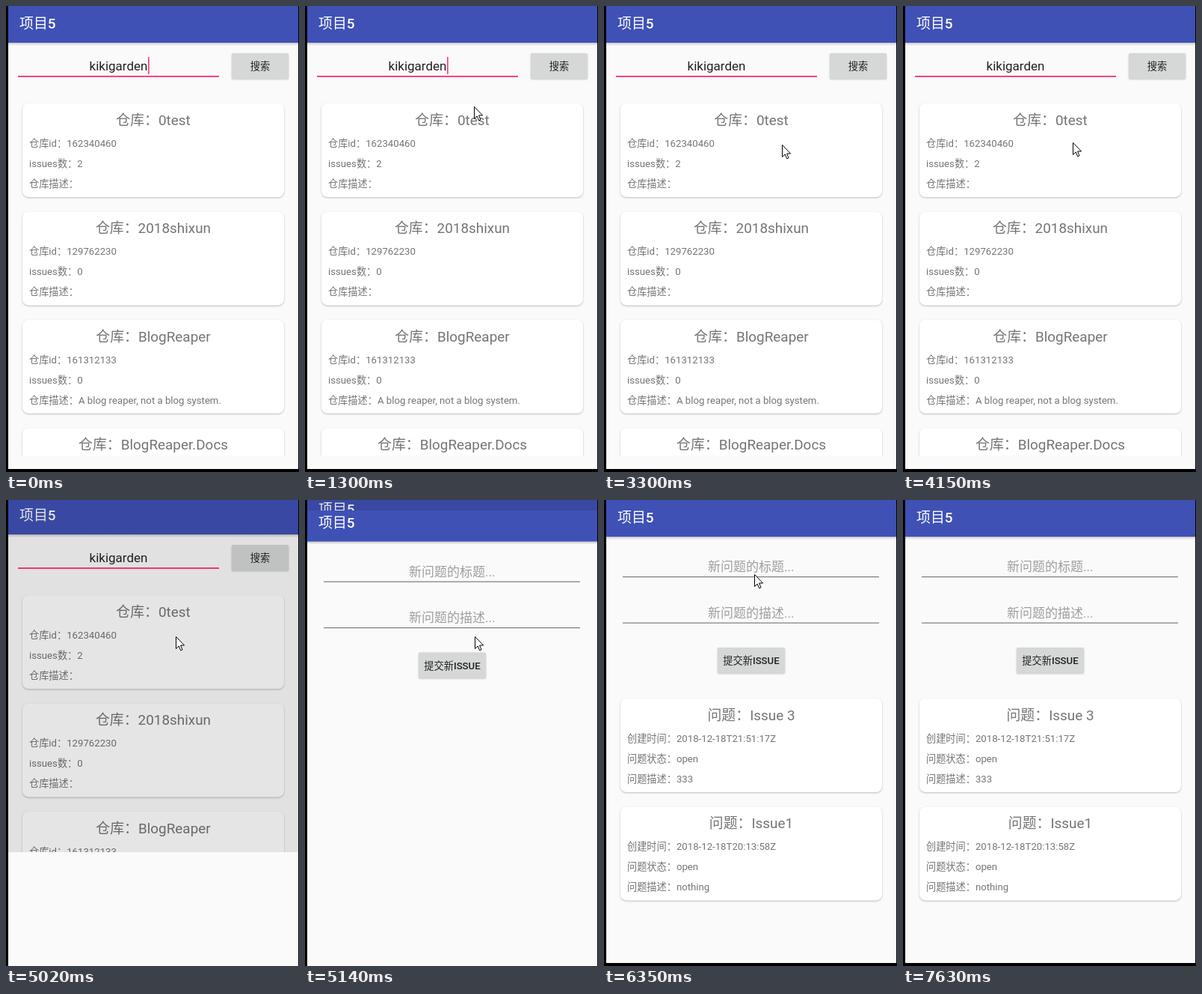
These frames come from a looping animation (392 px wide and 622 px high, 7.99 s). An HTML page:

```html
<!DOCTYPE html>
<html lang="zh-CN">
<head>
<meta charset="utf-8">
<title>项目5</title>
<style>
  html, body { margin: 0; width: 100%; height: 100%; overflow: hidden; background: #000; }
  svg { display: block; width: 392px; height: 622px; }
  text { font: 13.2px Roboto, "Noto Sans CJK SC", "Noto Sans CJK", sans-serif; fill: #757575; white-space: pre; }
  .mid { text-anchor: middle; }
  .bar { font-size: 18.9px; font-weight: 500; fill: #fff; }
  .head { font-size: 18.9px; }
  .field { font-size: 17px; fill: #212121; }
  .hint { font-size: 17px; fill: #9e9e9e; }
  .btn { font-weight: 500; fill: #212121; }
  .card { fill: #fff; filter: drop-shadow(0 1px 1px rgba(0,0,0,.25)); }
  .key { fill: #d6d7d7; filter: drop-shadow(0 1px 1px rgba(0,0,0,.22)); }
</style>
</head>
<body>
<svg id="stage" viewBox="0 0 392 622"></svg>
<script>
const LOOP = 7990;
const OPEN = 5020, SETTLED = 5190, LOADED = 5350;

const text = (x, y, cls, s) => `<text x="${x}" y="${y}" class="${cls}">${s}</text>`;

const card = (y, title, lines) =>
  `<rect class="card" x="22" y="${y}" width="350" height="125" rx="8"/>` +
  text(197, y + 28.8, 'mid head', title) +
  lines.map((s, i) => text(31, y + 57.7 + i * 27.1, '', s)).join('');

const repo = (i, name, id, issues, about) =>
  card(130 + i * 144.4, `仓库：${name}`, [`仓库id：${id}`, `issues数：${issues}`, `仓库描述：${about}`]);

const issue = (i, name, time, about) =>
  card(265 + i * 144.4, `问题：${name}`, [`创建时间：${time}`, '问题状态：open', `问题描述：${about}`]);

const button = (x, y, w, label) =>
  `<rect class="key" x="${x}" y="${y}" width="${w}" height="34" rx="1.5"/>` +
  text(x + w / 2, y + 22, 'mid btn', label);

const hint = (y, label) =>
  text(196.7, y - 6.7, 'mid hint', label) +
  `<rect x="25" y="${y}" width="343" height="1.2" fill="#7c7c7c"/>`;

const page = body =>
  `<rect x="3" width="388" height="618" fill="#fafafa"/>${body}
   <rect x="3" y="49" width="388" height="4" fill="url(#shade)"/>
   <rect x="3" y="-40" width="388" height="89" fill="#3f51b5"/>` +
  text(18, 30, 'bar', '项目5');

const stage = document.getElementById('stage');
stage.innerHTML = `
  <defs>
    <linearGradient id="shade" x2="0" y2="1">
      <stop stop-opacity=".2"/><stop offset="1" stop-opacity="0"/>
    </linearGradient>
    <clipPath id="list"><rect width="392" height="600"/></clipPath>
    <clipPath id="reveal"><rect id="window" width="392" height="622"/></clipPath>
    <clipPath id="screen"><rect x="3" width="388" height="622"/></clipPath>
  </defs>
  <rect width="392" height="622"/>
  <g clip-path="url(#screen)">
    <g id="search">${page(
      text(150.5, 86, 'mid field', 'kikigarden') +
      `<rect id="caret" x="190" y="68" width="1.7" height="23" fill="#ff4081"/>
       <rect x="16" y="93" width="269" height="2" fill="#ff4081"/>` +
      button(302, 63, 76, '搜索') +
      '<g clip-path="url(#list)">' +
      repo(0, '0test', 162340460, 2, '') +
      repo(1, '2018shixun', 129762230, 0, '') +
      repo(2, 'BlogReaper', 161312133, 0, 'A blog reaper, not a blog system.') +
      repo(3, 'BlogReaper.Docs', '', 0, '') +
      '</g>')}</g>
    <rect id="dim" width="392" height="622" opacity=".1"/>
    <g id="cover" clip-path="url(#reveal)"><g id="detail">${page(
      hint(102, '新问题的标题...') +
      hint(163.5, '新问题的描述...') +
      button(152, 197, 90, '提交新ISSUE') +
      '<g id="issues">' +
      issue(0, 'Issue 3', '2018-12-18T21:51:17Z', '333') +
      issue(1, 'Issue1', '2018-12-18T20:13:58Z', 'nothing') +
      '</g>')}</g></g>
  </g>
  <path id="pointer" d="M.5 .5V16.5L4.2 13L6.7 18.8L9 17.8L6.6 12H11.6Z" fill="#fff" stroke="#000"/>`;

const el = id => document.getElementById(id);
const [search, dim, cover, detail, issues, caret, pointer, reveal] =
  ['search', 'dim', 'cover', 'detail', 'issues', 'caret', 'pointer', 'window'].map(el);

// time, x, y
const path = [
  [100, 289, 303], [400, 268, 190], [800, 251, 126], [1300, 226, 134],
  [1600, 215, 170], [2400, 217, 190], [2600, 217, 190], [3400, 241, 184],
  [4100, 227, 182], [5250, 227, 182], [6050, 201, 109], [6350, 201, 99],
  [6750, 201, 86], [7030, 201, 86], [7230, 216, 180], [7530, 261, 539]
];

// time, new page offset, old page offset, top of the revealed part
const slide = [[5020, 23, -3, 470], [5070, 14, -7, 130], [5140, 6.5, -11, 14], [5190, 0, -13, 0]];

function pointAt(t) {
  const i = path.findIndex(p => p[0] > t);
  if (i < 0) return path[path.length - 1].slice(1);
  const [a, b] = [path[i - 1], path[i]];
  const k = (t - a[0]) / (b[0] - a[0]);
  return [1, 2].map(n => Math.round(a[n] + (b[n] - a[n]) * k));
}

// The pointer is redrawn ten times a second.
function tick(t) {
  const phase = t < OPEN ? 0 : t < 7030 ? 50 : 30;
  return Math.floor((t - phase) / 100) * 100 + phase;
}

const show = (node, on) => node.setAttribute('visibility', on ? 'visible' : 'hidden');

function draw(t) {
  const opened = t >= OPEN;
  const [, enter, exit, top] = slide.filter(s => s[0] <= t).pop() || [0, 0, 0, 0];
  search.setAttribute('transform', `translate(0 ${exit})`);
  detail.setAttribute('transform', `translate(0 ${enter})`);
  reveal.setAttribute('y', top);
  show(search, t < SETTLED);
  show(dim, opened && t < SETTLED);
  show(cover, opened);
  show(issues, t >= LOADED);
  show(caret, t < 1400 || (t >= 1900 && t < 2400));

  const visible = t >= 100 && t < 7630;
  show(pointer, visible);
  if (visible) pointer.setAttribute('transform', `translate(${pointAt(tick(t))})`);
}

function frame() {
  draw(performance.now() % LOOP);
  requestAnimationFrame(frame);
}
frame();
</script>
</body>
</html>
```
